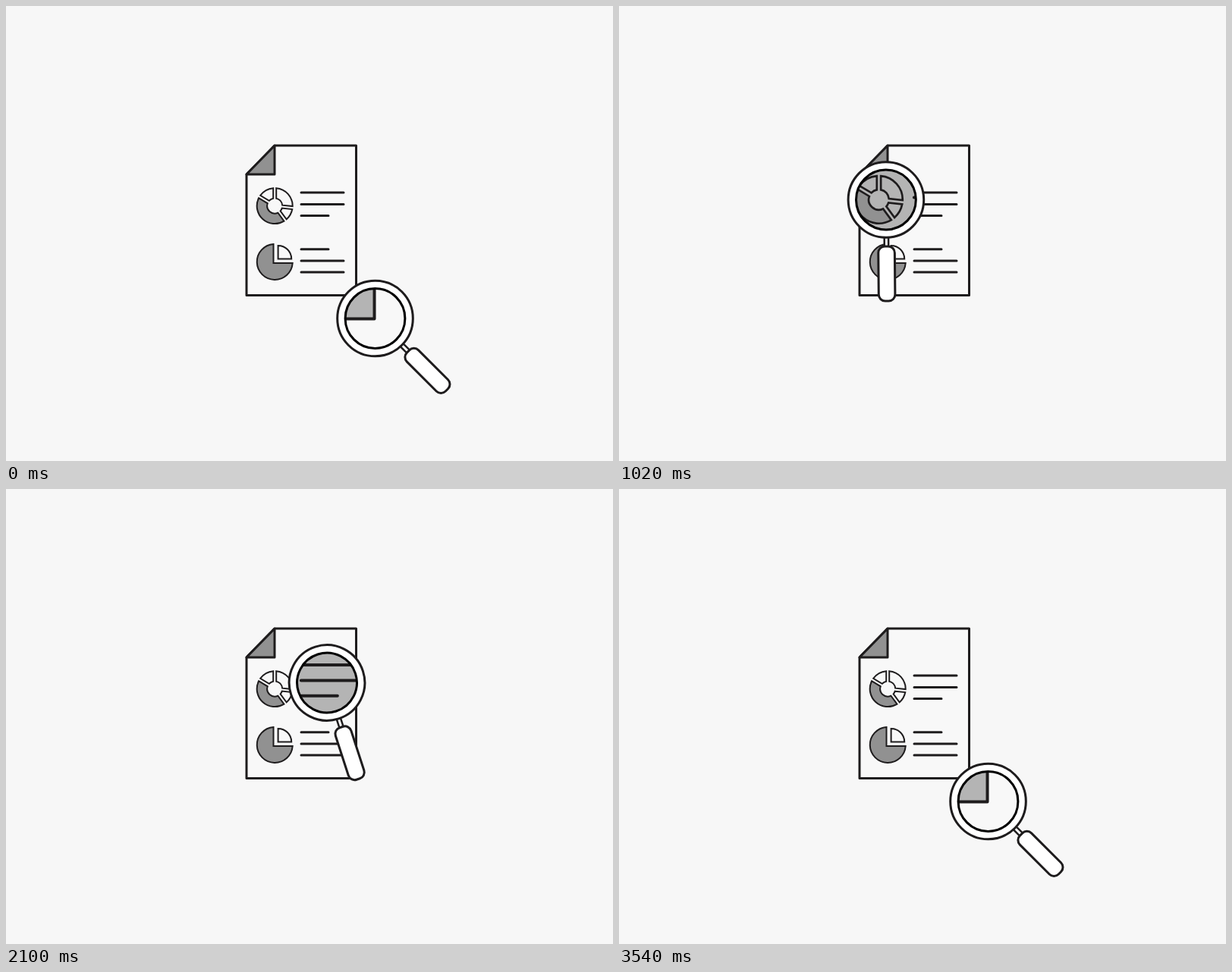
An HTML page that plays this animation: 800x600 px, repeating every 3.73 s.

```html
<!DOCTYPE html>
<html lang="en">
<head>
<meta charset="utf-8">
<title>Report under a magnifying glass</title>
<style>
  html, body { margin: 0; width: 100%; height: 100%; overflow: hidden; background: #f7f7f7; }
  svg { display: block; width: 800px; height: 600px; }
  #page { --paper: inherit; }
  .ink { stroke: #1e1c1d; stroke-width: 3; stroke-linecap: round; stroke-linejoin: round; }
  .thin { stroke-width: 2; stroke-linejoin: miter; }
  .paper { fill: var(--paper); }
  .gray { fill: #919191; }
  .white { fill: #fff; }
</style>
</head>
<body>
<svg viewBox="0 0 800 600" style="--paper:#f8f8f8">
  <defs>
    <clipPath id="lensClip"><circle id="clipCircle" r="39.5"/></clipPath>
    <g id="report" class="ink">
      <path class="paper" d="M354 184H461.5V381.5H317V222Z"/>
      <path class="gray" d="M354 184V222H317Z"/>
      <g id="donut" class="thin"></g>
      <path class="gray thin" d="M352.5 339V314A23.5 23.5 0 1 0 377.7 339Z"/>
      <path class="paper thin" d="M358.6 333.4V316A17.6 17.6 0 0 1 376.2 333.4Z"/>
      <path d="M389 246H445M389 261.4H445M389 276.6H425M389 320.8H425M389 336H445M389 351H445"/>
    </g>
  </defs>
  <use href="#report"/>
  <g clip-path="url(#lensClip)">
    <rect width="800" height="600" fill="#f8f8f8"/>
    <use href="#report" style="--paper:#b4b4b4"
         transform="translate(389.4 288.2) scale(1.3333) translate(-389.4 -288.2)"/>
  </g>
  <g id="glass" class="ink">
    <rect class="white" x="-2.7" y="48" width="5.4" height="16" stroke-width="2.5"/>
    <rect class="white" x="-10.8" y="61.5" width="21.6" height="72" rx="8.5"/>
    <circle r="44.6" fill="none" stroke="#fff" stroke-width="10"/>
    <circle r="49.8" fill="none"/>
    <circle r="39.4" fill="none" stroke="#000"/>
  </g>
</svg>
<script>
const LOOP = 3730;
const byId = id => document.getElementById(id);

// Ring slice between two angles (degrees), with straight parallel gaps.
function slice(from, to, fill) {
  const cx = 354.2, cy = 263.6, outer = 23.5, inner = 10, gap = 2;
  const rad = d => d * Math.PI / 180;
  const point = (r, deg, side) => {
    const a = rad(deg) + side * Math.asin(gap / r);
    return `${cx + r * Math.cos(a)} ${cy + r * Math.sin(a)}`;
  };
  return `<path class="${fill}" d="M${point(outer, from, 1)}
    A${outer} ${outer} 0 0 1 ${point(outer, to, -1)}
    L${point(inner, to, -1)}
    A${inner} ${inner} 0 0 0 ${point(inner, from, 1)}Z"/>`;
}
byId('donut').innerHTML =
  slice(53.6, 211, 'gray') + slice(211, 270, 'paper') +
  slice(270, 366, 'paper') + slice(6, 53.6, 'paper');

// Cubic Bézier easing with flat ends: control points (x1, 0) and (x2, 1).
const ease = (x1, x2) => u => {
  if (u <= 0) return 0;
  if (u >= 1) return 1;
  let lo = 0, hi = 1, s = 0.5;
  for (let i = 0; i < 24; i++) {
    s = (lo + hi) / 2;
    const x = 3 * s * (1 - s) ** 2 * x1 + 3 * s * s * (1 - s) * x2 + s ** 3;
    if (x < u) lo = s; else hi = s;
  }
  return s * s * (3 - 2 * s);
};

const swift = ease(0.35, 0.27), glide = ease(0.33, 0.43);

// Each track: start value, then moves [begin, end, value, easing].
const tracks = {
  x: [486.5, [0, 900, 349.7, swift], [900, 2160, 423.2, glide], [2240, 3540, 486.5, ease(0.79, 0.375)]],
  y: [412, [0, 900, 255.5, swift], [2640, 3540, 412, swift]],
  angle: [45, [0, 900, 0, swift], [900, 2160, 18, glide], [2240, 3540, 45, ease(0.91, 0.315)]]
};

function valueAt([start, ...moves], t) {
  return moves.reduce((v, [begin, end, target, curve]) =>
    v + (target - v) * curve((t - begin) / (end - begin)), start);
}

function draw() {
  const t = performance.now() % LOOP;
  const x = valueAt(tracks.x, t), y = valueAt(tracks.y, t), angle = valueAt(tracks.angle, t);
  byId('glass').setAttribute('transform', `translate(${x} ${y}) rotate(${-angle})`);
  byId('clipCircle').setAttribute('cx', x);
  byId('clipCircle').setAttribute('cy', y);
  requestAnimationFrame(draw);
}
draw();
</script>
</body>
</html>
```
